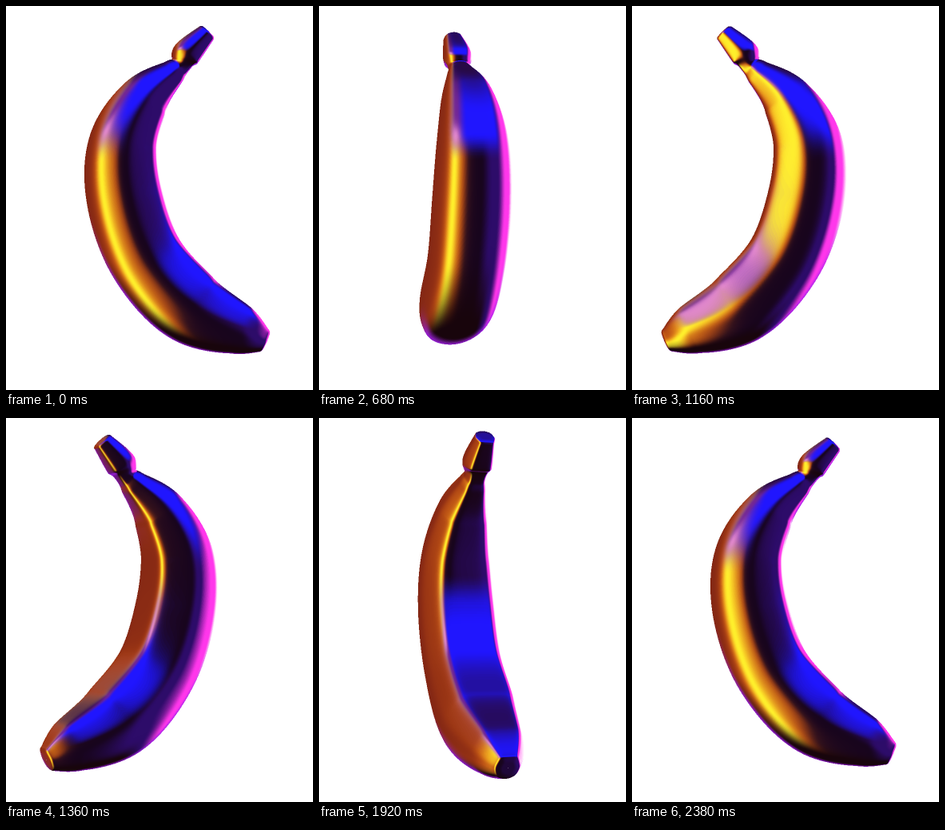
Recreate the animation shown at these times as an HTML page with a canvas. Size 384 px wide and 480 px high, loop 2400 ms.

```html
<!DOCTYPE html>
<html lang="en">
<head>
<meta charset="utf-8">
<title>Spinning banana</title>
<style>
  html, body { margin: 0; width: 100%; height: 100%; overflow: hidden; background: #fff; }
  canvas { display: block; width: 384px; height: 480px; }
</style>
</head>
<body>
<canvas id="stage" width="384" height="480"></canvas>
<script>
const W = 384, H = 480, SS = 2, BW = W * SS, BH = H * SS;
const LOOP = 2400, STEP = 20, CX = 183, CY = 235, DIST = 1500;
const SEG = 96, SUB = 14, TAU = Math.PI * 2, DEG = Math.PI / 180;

const clamp = (v, a, b) => Math.min(b, Math.max(a, v));
const smooth = (a, b, v) => {
  const t = clamp((v - a) / (b - a), 0, 1);
  return t * t * (3 - 2 * t);
};
const bell = (v, mid, width) => Math.exp(-(((v - mid) / width) ** 2));
const mix = (a, b, t) => a.map((v, i) => v + (b[i] - v) * t);

// ---- Material: colour by view-space normal, y up ----
function shade(x, y) {
  let c = [24, 5, 30];
  const over = (rgb, amount) => { c = mix(c, rgb, amount); };

  // warm light on the left, magenta on the right
  over([130, 38, 20], smooth(-.05, -.25, x));
  over([235, 105, 20], bell(x, -.45, .27));
  over([255, 240, 45], bell(x, -.43, .15));
  over([45, 12, 105], smooth(.2, .45, x));
  over([255, 55, 235], smooth(.56, .76, x));
  over([255, 255, 255], smooth(.85, 1, x));
  over([24, 5, 12], smooth(-.33, -.75, y) * smooth(.6, .4, x));

  // blue sky from above
  let sky = mix([115, 40, 150], [32, 22, 255], smooth(-.4, -.1, x));
  sky = mix(sky, [40, 10, 70], smooth(.5, .92, y));
  over(sky, smooth(.08, .3, y) * smooth(-.8, -.4, x) * smooth(.7, .54, x));
  over([255, 160, 225], .75 * bell(x, -.42, .15) * bell(y, .26, .09));

  // violet rim from below
  over([165, 35, 235], .9 * smooth(.88, 1, Math.hypot(x, y)) * smooth(.15, .6, -y));
  return c;
}

const LUT = 256, half = (LUT - 1) / 2;
const lut = new Uint32Array(LUT * LUT);
for (let j = 0; j < LUT; j++) {
  for (let i = 0; i < LUT; i++) {
    const [r, g, b] = shade(i / half - 1, 1 - j / half);
    lut[j * LUT + i] = (255 << 24 | b << 16 | g << 8 | r) >>> 0;
  }
}

// ---- Mesh ----
// Spine from stem to tip: x, y, half width
const spine = [
  [251, 33, 12], [226, 59, 18], [218, 73, 13], [208, 83, 17], [172, 117, 32], [146, 173, 43],
  [148, 240, 47.5], [175, 315, 47.5], [229, 375, 46.7], [292, 405, 32], [323, 419, 15]
];

function spinePoint(u) {
  const i = Math.min(spine.length - 2, Math.floor(u)), t = u - i;
  const [p0, p1, p2, p3] = [-1, 0, 1, 2].map(d => spine[clamp(i + d, 0, spine.length - 1)]);
  return p1.map((v, k) => v + .5 * t * (p2[k] - p0[k] +
    t * (2 * p0[k] - 5 * v + 4 * p2[k] - p3[k] + t * (3 * (v - p2[k]) + p3[k] - p0[k]))));
}

function makeRings() {
  const end = spine.length - 1, rings = [];
  for (let k = 0; k <= end * SUB; k++) {
    const u = k / SUB, [x, y, r] = spinePoint(u);
    const a = spinePoint(Math.max(0, u - .03)), b = spinePoint(Math.min(end, u + .03));
    const len = Math.hypot(b[0] - a[0], b[1] - a[1]);
    rings.push({ x, y, r, dx: (b[0] - a[0]) / len, dy: (b[1] - a[1]) / len });
  }
  // bevelled flat ends
  const cap = (ring, dir) => [.88, .45, .02].map(f => ({
    ...ring, r: ring.r * f, x: ring.x + ring.dx * dir * 1.5, y: ring.y + ring.dy * dir * 1.5
  }));
  return [...cap(rings[0], -1).reverse(), ...rings, ...cap(rings[rings.length - 1], 1)];
}

// Rounded polygon: flat inner face, two ridges, round back
function makeSection() {
  const faces = [[0, .88], [70, .94], [-70, .94], [105, 1], [-105, 1]];
  const K = 18, pts = [];
  for (let j = 0; j < SEG; j++) {
    const a = j / SEG * TAU;
    let sum = 1.06 ** -K;
    for (const [deg, h] of faces) sum += (Math.max(0, Math.cos(a - deg * DEG)) / h) ** K;
    const r = sum ** (-1 / K);
    pts.push([r * Math.cos(a), r * Math.sin(a)]);
  }
  const ps = pts.map(p => p[0]), lo = Math.min(...ps), hi = Math.max(...ps);
  const top = Math.max(...pts.map(p => p[1]));
  return pts.map(([p, v]) => [(2 * p - lo - hi) / (hi - lo), v / top * 1.04]);
}

const rings = makeRings(), section = makeSection();
const N = rings.length * SEG;
const pos = new Float32Array(N * 3), nor = new Float32Array(N * 3);

rings.forEach(({ x, y, r, dx, dy }, k) => section.forEach(([p, v], j) => {
  pos.set([x + p * r * dy - CX, CY - y + p * r * dx, v * r], (k * SEG + j) * 3);
}));

for (let k = 0; k < rings.length; k++) {
  const ka = Math.max(0, k - 1), kb = Math.min(rings.length - 1, k + 1);
  for (let j = 0; j < SEG; j++) {
    const diff = (a, b) => [0, 1, 2].map(c => pos[b * 3 + c] - pos[a * 3 + c]);
    const u = diff(k * SEG + (j + SEG - 1) % SEG, k * SEG + (j + 1) % SEG);
    const w = diff(ka * SEG + j, kb * SEG + j);
    const n = [u[1] * w[2] - u[2] * w[1], u[2] * w[0] - u[0] * w[2], u[0] * w[1] - u[1] * w[0]];
    const len = Math.hypot(...n) || 1;
    nor.set(n.map(c => c / len), (k * SEG + j) * 3);
  }
}

// ---- Rasteriser ----
const ctx = document.getElementById('stage').getContext('2d');
const buffer = document.createElement('canvas');
buffer.width = BW;
buffer.height = BH;
const bctx = buffer.getContext('2d');
const image = bctx.createImageData(BW, BH);
const pixels = new Uint32Array(image.data.buffer);
const zbuf = new Float32Array(BW * BH);
const sx = new Float32Array(N), sy = new Float32Array(N), sz = new Float32Array(N);
const nx = new Float32Array(N), ny = new Float32Array(N);

function triangle(a, b, c) {
  const ax = sx[a], ay = sy[a], bx = sx[b], by = sy[b], cx = sx[c], cy = sy[c];
  const area = (bx - ax) * (cy - ay) - (cx - ax) * (by - ay);
  if (area >= 0) return;
  const x0 = Math.max(0, Math.ceil(Math.min(ax, bx, cx)));
  const x1 = Math.min(BW - 1, Math.floor(Math.max(ax, bx, cx)));
  const y0 = Math.max(0, Math.ceil(Math.min(ay, by, cy)));
  const y1 = Math.min(BH - 1, Math.floor(Math.max(ay, by, cy)));
  for (let y = y0; y <= y1; y++) {
    for (let x = x0; x <= x1; x++) {
      const wb = ((x - ax) * (cy - ay) - (cx - ax) * (y - ay)) / area;
      const wc = ((bx - ax) * (y - ay) - (x - ax) * (by - ay)) / area;
      const wa = 1 - wb - wc;
      if (wa < -1e-4 || wb < -1e-4 || wc < -1e-4) continue;
      const z = wa * sz[a] + wb * sz[b] + wc * sz[c], at = y * BW + x;
      if (z <= zbuf[at]) continue;
      zbuf[at] = z;
      const u = (wa * nx[a] + wb * nx[b] + wc * nx[c] + 1) * half;
      const v = (1 - wa * ny[a] - wb * ny[b] - wc * ny[c]) * half;
      pixels[at] = lut[clamp(v | 0, 0, LUT - 1) * LUT + clamp(u | 0, 0, LUT - 1)];
    }
  }
}

function draw(time) {
  const turn = time / LOOP * TAU + 2 * DEG, co = Math.cos(turn), si = Math.sin(turn);
  for (let i = 0, q = 0; i < N; i++, q += 3) {
    const z = pos[q + 2] * co - pos[q] * si, scale = SS * DIST / (DIST - z);
    sx[i] = CX * SS + (pos[q] * co + pos[q + 2] * si) * scale;
    sy[i] = CY * SS - pos[q + 1] * scale;
    sz[i] = z;
    nx[i] = nor[q] * co + nor[q + 2] * si;
    ny[i] = nor[q + 1];
  }
  pixels.fill(0xffffffff);
  zbuf.fill(-1e6);
  for (let k = 0; k < rings.length - 1; k++) {
    for (let j = 0; j < SEG; j++) {
      const a = k * SEG + j, b = k * SEG + (j + 1) % SEG;
      triangle(a, b, a + SEG);
      triangle(b + SEG, a + SEG, b);
    }
  }
  bctx.putImageData(image, 0, 0);
  ctx.drawImage(buffer, 0, 0, W, H);
}

const start = performance.now();
let last = -1;
function tick() {
  const t = Math.floor((performance.now() - start) % LOOP / STEP) * STEP;
  if (t !== last) draw(last = t);
  requestAnimationFrame(tick);
}
tick();
</script>
</body>
</html>
```
